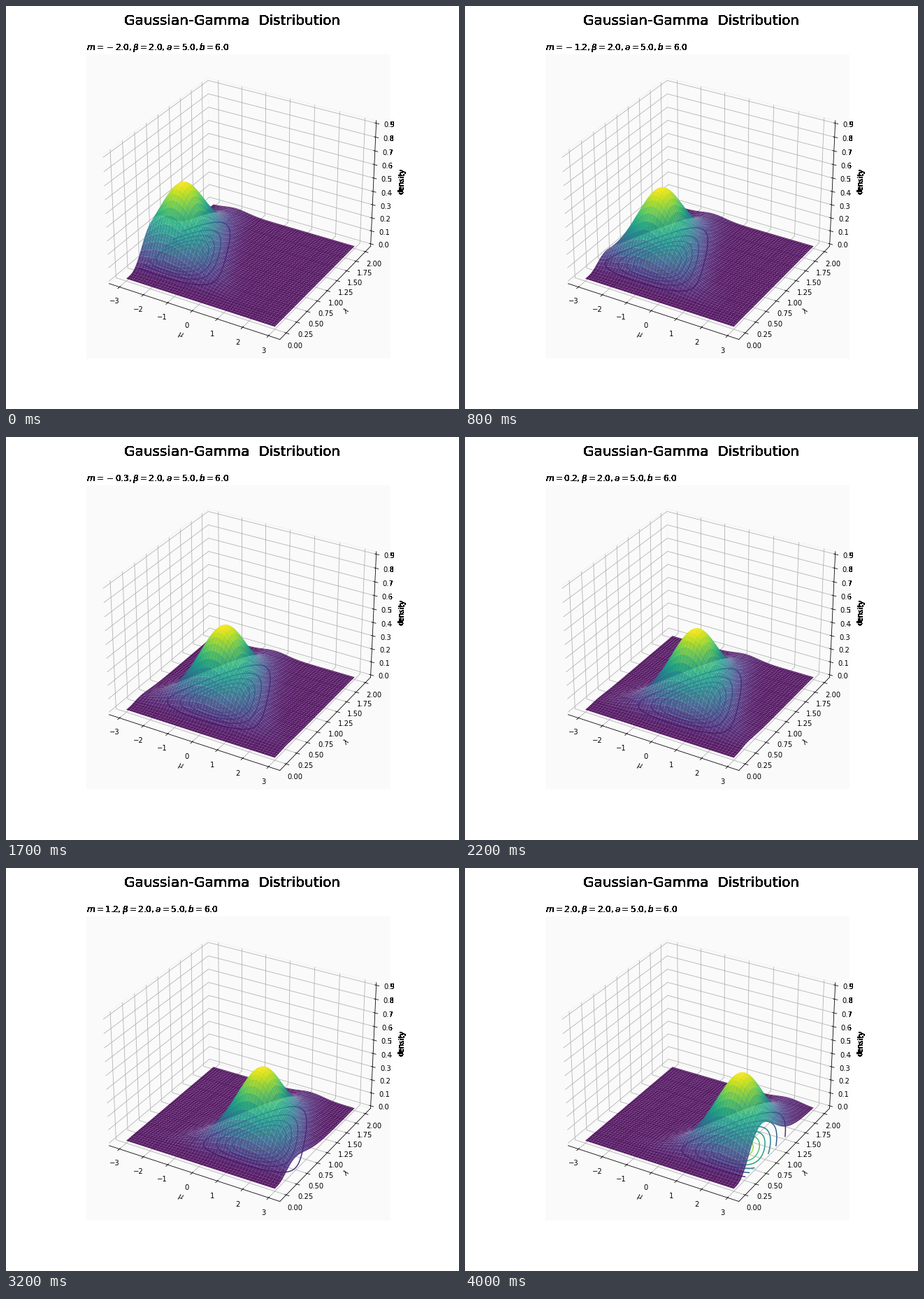
Write a matplotlib script that moves like this. It is 648 by 576 pixels and loops after 4100 ms.

```python
import math

import matplotlib.pyplot as plt
import numpy as np
from matplotlib.animation import FuncAnimation

W, H, DPI = 648, 576, 72
BETA, A, B = 2.0, 5.0, 6.0
PAPER = "#fafafa"

# Square plot area in pixels
SIDE = 0.755 * H
LEFT = 0.5125 * W - SIDE / 2
BOTTOM = 0.125 * H
EDGE = LEFT + SIDE


def harden(label=None):
    """Make soft text pixels solid black; with a label, only right of EDGE."""
    def apply(image, dpi):
        image = image.copy()
        start = 0
        if label is not None:
            start = max(0, math.ceil(EDGE - label.get_window_extent().x0))
        part = image[:, start:]
        part[..., :3] = 0
        part[..., 3] = part[..., 3] > 0.1
        return image, 0, 0
    return apply


def density(mu, lam, m):
    """Normal in mu with precision BETA * lam, times a Gamma in lam."""
    normal = np.sqrt(BETA * lam / (2 * np.pi)) * np.exp(-BETA * lam * (mu - m) ** 2 / 2)
    gamma = B ** A / math.gamma(A) * lam ** (A - 1) * np.exp(-B * lam)
    return normal * gamma


def caption(m):
    sign = r"\hspace{0.2}{-}\hspace{0.2}" if m < 0 else ""
    return rf"$m={sign}{abs(m):.1f}, \beta={BETA}, a={A}, b={B}$"


def padded(low, high):
    pad = (high - low) / 48
    return low - pad, high + pad


fig = plt.figure(figsize=(W / DPI, H / DPI), dpi=DPI, facecolor="white")
ax = fig.add_axes([LEFT / W, BOTTOM / H, SIDE / W, SIDE / H],
                  projection="3d", computed_zorder=False, facecolor=PAPER)
ax.set_xlim(*padded(-3.3, 3.3))
ax.set_ylim(*padded(-0.1, 2.1))
ax.set_zlim(*padded(0, 0.9))
ax.set_xticks(np.arange(-3, 4))
ax.set_yticks(np.arange(9) / 4)
ax.set_zticks(np.arange(10) / 10)
ax.set_xlabel(r"$\mu$")
ax.set_ylabel(r"$\lambda$")
ax.set_zlabel("density").set_agg_filter(harden())

for axis in (ax.xaxis, ax.yaxis, ax.zaxis):
    axis.set_pane_color((0.98, 0.98, 0.98, 1))
    axis.pane.set_edgecolor("#f2f2f2")
for tick in ax.zaxis.get_major_ticks():
    tick.label1.set_agg_filter(harden(tick.label1))

fig.suptitle("Gaussian-Gamma  Distribution", fontsize=20).set_agg_filter(harden())
title = fig.text(LEFT / W, (BOTTOM + SIDE + 6) / H, "", fontsize=12, va="baseline")
title.set_agg_filter(harden())

mu, lam = np.meshgrid(np.linspace(-3, 3, 100), np.linspace(0, 2, 100))
levels = 0.08 * np.arange(1, 7)
drawn = []


def update(i):
    while drawn:
        drawn.pop().remove()
    m = (i - 20) / 10
    z = density(mu, lam, m)
    drawn.append(ax.contour(mu, lam, z, levels=levels, vmin=0, vmax=0.56,
                            cmap="viridis", offset=0, zorder=1))
    drawn.append(ax.plot_surface(mu, lam, z, cmap="viridis", alpha=0.9, zorder=2))
    title.set_text(caption(m))
    return drawn


anim = FuncAnimation(fig, update, frames=41, interval=100, repeat=True, repeat_delay=0)
plt.show()
```
